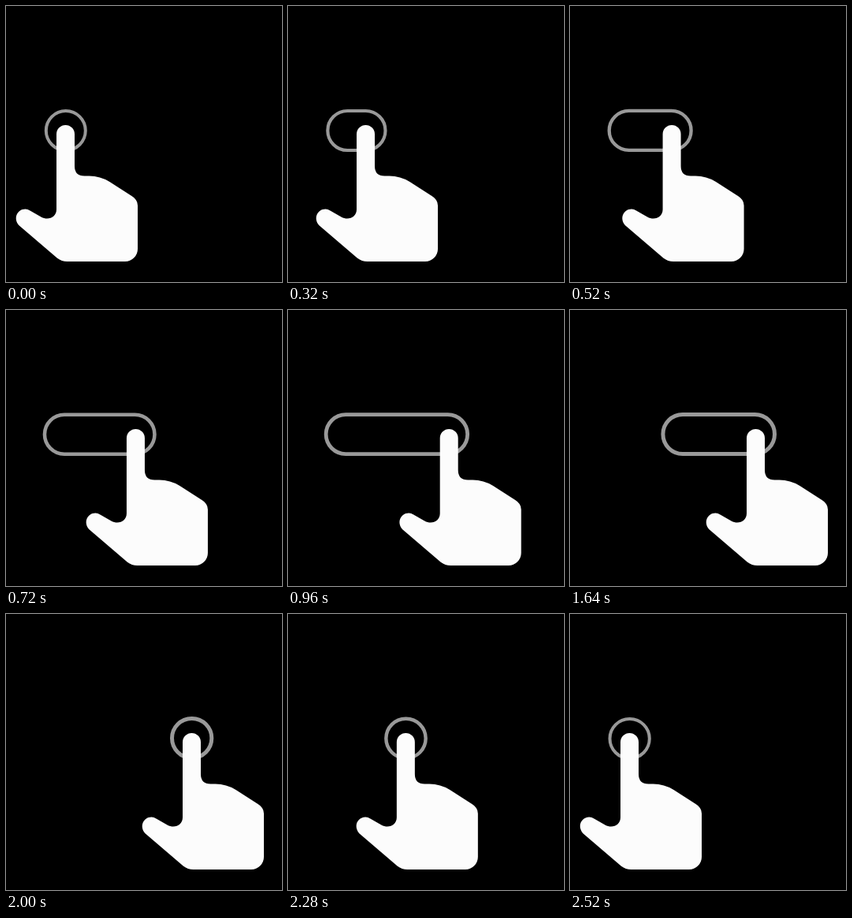
An HTML page that plays this animation: 350 px wide and 350 px high, repeating every 2.68 s.

```html
<!DOCTYPE html>
<html lang="en">
<head>
<meta charset="utf-8">
<title>Swipe gesture</title>
<style>
  html, body { margin: 0; width: 100%; height: 100%; overflow: hidden; background: #000; }
  svg { display: block; width: 100vw; height: 100vh; }
</style>
</head>
<body>
<svg viewBox="0 0 350 350">
  <rect id="trail" height="50" rx="25" fill="none" stroke="#999"/>
  <path id="hand" fill="#fcfcfc" d="M-11.5 162.5a11.5 11.5 0 0 1 23 0V203Q11.5 215.5 24 215.5H30
    Q44 215.5 56 223L84 241Q91.5 245.5 91.5 253V308A16 16 0 0 1 75.5 324H2Q-5 324 -10.5 319.8L-59 278.3
    C-67 269 -61 257.5 -51 257.5Q-48 257.5 -45 259.5L-31 267.5C-22 272.5 -11.5 268 -11.5 258Z"/>
</svg>
<script>
  const LOOP = 2680, STEP = 40;
  const DRAG_END = 1340, SHRINK_END = 2000, RETURN_END = 2520;
  const START = 75.5, END = 235.5, RADIUS = 25;
  const trail = document.getElementById('trail');
  const hand = document.getElementById('hand');

  const progress = (t, from, to) => Math.min(1, Math.max(0, (t - from) / (to - from)));
  const ease = u => u * u * (3 - 2 * u);
  const mix = (a, b, u) => a + (b - a) * u;

  function draw(t) {
    const drag = ease(progress(t, 0, DRAG_END));
    const shrink = ease(progress(t, DRAG_END, SHRINK_END));
    const back = progress(t, SHRINK_END, RETURN_END);
    const finger = mix(mix(START, END, drag), START, back);

    // The outline stretches slightly past its start and lags behind the finger.
    const left = back ? finger : mix(START + 0.3 - 3.3 * drag, END, shrink);
    const right = finger + 0.3 - 2.3 * drag * (1 - shrink);

    trail.setAttribute('x', left - RADIUS);
    trail.setAttribute('y', 133.1 - 0.6 * (drag - back));
    trail.setAttribute('width', Math.max(0, right - left) + 2 * RADIUS);
    trail.setAttribute('stroke-width', 4 + drag - back);
    hand.setAttribute('transform', `translate(${finger})`);
  }

  const begin = performance.now();
  function tick() {
    const t = (performance.now() - begin) % LOOP;
    draw(Math.floor(t / STEP) * STEP);
    requestAnimationFrame(tick);
  }
  tick();
</script>
</body>
</html>
```
